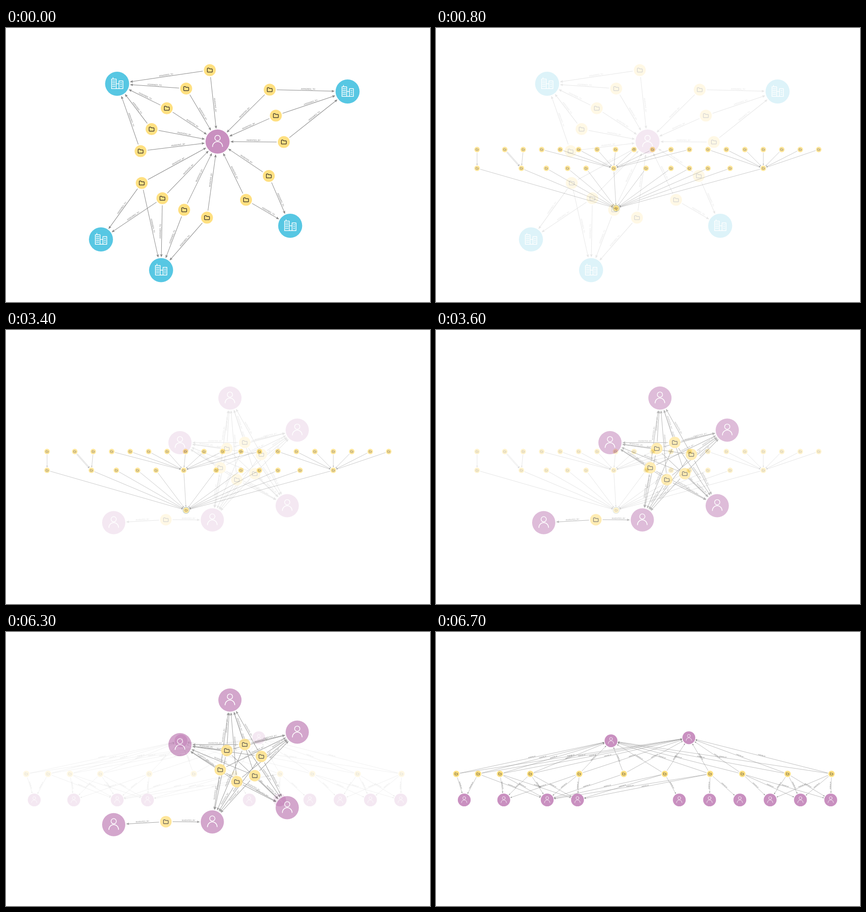
Recreate the animation shown at these times as an HTML page with a canvas. Size 931x602 px, loop 8 s.

```html
<!DOCTYPE html>
<html lang="en">
<head>
<meta charset="utf-8">
<title>Graph views</title>
<style>
html, body { margin: 0; width: 100%; height: 100%; overflow: hidden; background: #fff; }
canvas { display: block; width: 931px; height: 602px; }
</style>
</head>
<body>
<canvas id="stage"></canvas>
<script>
const W = 931, H = 602, LOOP = 8000;
const GREY = '#848484';
const dpr = window.devicePixelRatio || 1;

const kinds = {
  file: { r: 13.1, fill: '#ffe081', ink: '#222', pen: 1.25 },
  person: { r: 26.4, fill: '#c990c0', ink: '#fff', pen: 1.6 },
  company: { r: 26.4, fill: '#57c7e3', ink: '#fff', pen: 1.5 }
};
const close = { line: 1, text: '#6a6a6a', slide: 5 };
const distant = { line: 0.5, text: '#333', slide: 0 };

const times = (n, f) => Array.from({ length: n }, (_, i) => f(i));
const steps = (from, step, n) => times(n, i => from + step * i);
const node = (kind, x, y) => ({ kind, x, y });
const row = (kind, y, xs) => xs.map(x => node(kind, x, y));
const invented = (a, b) => ({ a, b, label: 'INVENTED_BY' });
const assigned = (a, b) => ({ a, b, label: 'ASSIGNED_TO' });

// n files spread evenly on the parabola through three points
function curve(n, [x0, y0], [x1, y1], [x2, y2]) {
  return times(n, i => {
    const t = i / (n - 1);
    const a = (2 * t - 1) * (t - 1), b = 4 * t * (1 - t), c = t * (2 * t - 1);
    return node('file', a * x0 + b * x1 + c * x2, a * y0 + b * y1 + c * y2);
  });
}

function setup(canvas) {
  canvas.width = W * dpr;
  canvas.height = H * dpr;
  const g = canvas.getContext('2d');
  g.scale(dpr, dpr);
  return g;
}

function line(g, x0, y0, x1, y1) {
  g.moveTo(x0, y0);
  g.lineTo(x1, y1);
}

// Icons are drawn around the node centre at scale 1
const icons = {
  file(g) {
    g.roundRect(-5.4, -2.7, 10.9, 7.1, [0, 1, 1, 1]);
    line(g, -5.4, -2.7, -5, -4.4);
    g.lineTo(-1.8, -4.4);
    g.lineTo(-0.3, -2.7);
    // The tab opens into the body
    g.moveTo(-5.4, -2.7);
  },
  person(g) {
    g.arc(0, -7.8, 6, 0, Math.PI * 2);
    g.moveTo(-11, 11.3);
    g.arc(0, 11, 11, Math.PI, 0);
  },
  company(g) {
    g.rect(-12.3, -10.3, 10.4, 21);
    g.rect(4.2, -6.3, 8.6, 17);
    line(g, -9, -13.5, -9, -10.3);
    line(g, -1.9, 0, 4.2, 0);
    line(g, -1.9, 10.7, 4.2, 10.7);
    steps(-6, 4, 4).forEach(y => line(g, -10.3, y, -4.2, y));
    steps(-2, 4, 3).forEach(y => line(g, 7.3, y, 10, y));
  }
};
icons.file = g => {
  g.moveTo(-0.3, -2.7);
  g.lineTo(-1.8, -4.4);
  g.arcTo(-5.4, -4.4, -5.4, 4.4, 1);
  g.arcTo(-5.4, 4.4, 5.5, 4.4, 1);
  g.arcTo(5.5, 4.4, 5.5, -2.7, 1);
  g.arcTo(5.5, -2.7, -0.3, -2.7, 1);
  g.closePath();
};

function disc(g, r, fill) {
  g.beginPath();
  g.arc(0, 0, r, 0, Math.PI * 2);
  g.fillStyle = fill;
  g.fill();
}

function drawNode(g, n, k) {
  const { r, fill, ink, pen } = kinds[n.kind];
  g.save();
  g.translate(n.x, n.y);
  g.scale(k, k);
  if (n.ring) {
    disc(g, r + 3.2, '#9cb0a8');
    disc(g, r + 1.2, '#e3ece0');
  }
  disc(g, r, fill);
  g.strokeStyle = ink;
  g.lineWidth = pen;
  g.lineJoin = g.lineCap = 'round';
  g.beginPath();
  icons[n.kind](g);
  g.stroke();
  g.restore();
}

function drawEdge(g, { a, b, label, shift = 0 }, k, style) {
  const angle = Math.atan2(b.y - a.y, b.x - a.x);
  const start = (kinds[a.kind].r + 2.5) * k;
  const end = Math.hypot(b.x - a.x, b.y - a.y) - (kinds[b.kind].r + (b.ring ? 4 : 1.8)) * k;
  const head = 7 * k, notch = end - head * 0.8;
  g.save();
  g.translate(a.x, a.y);
  g.rotate(angle);
  g.translate(0, shift);
  g.strokeStyle = g.fillStyle = GREY;
  g.lineWidth = style.line;
  g.beginPath();
  line(g, start, 0, notch, 0);
  g.stroke();
  g.beginPath();
  line(g, end, 0, end - head, -2.8 * k);
  g.lineTo(notch, 0);
  g.lineTo(end - head, 2.8 * k);
  g.fill();
  if (label) {
    const flip = Math.cos(angle) < 0;
    g.translate((start + end) / 2 + (flip ? 0 : style.slide * k), 0);
    if (flip) g.rotate(Math.PI);
    g.scale(k, k);
    g.font = '4.45px "Liberation Sans", Arial, sans-serif';
    g.textAlign = 'center';
    g.fillStyle = style.text;
    g.fillText(label, 0, -1.9);
  }
  g.restore();
}

function render({ k, style, nodes, edges }) {
  const canvas = document.createElement('canvas');
  const g = setup(canvas);
  g.fillStyle = '#fff';
  g.fillRect(0, 0, W, H);
  edges.forEach(e => drawEdge(g, e, k, style));
  nodes.forEach(n => drawNode(g, n, k));
  return canvas;
}

function inventorHub() {
  const hub = node('person', 464.5, 249.5);
  const nodes = [hub], edges = [];
  const fan = (x, y, docs) => {
    const firm = node('company', x, y);
    nodes.push(firm, ...docs);
    docs.forEach(d => edges.push(invented(d, hub), assigned(d, firm)));
  };
  const low = curve(4, [298, 340.5], [367, 387.7], [441.3, 416.7]);
  fan(244, 122.5, curve(5, [447.5, 92.5], [353, 176.3], [295.5, 270.5]));
  fan(750, 139.5, curve(3, [579, 135.5], [592.5, 192.5], [610, 250.5]));
  fan(624, 434.5, curve(2, [577, 325], [552, 351], [527, 377.5]));
  fan(340.5, 532, low);
  const shared = node('company', 208.5, 464.5);
  nodes.push(shared);
  low.slice(0, 2).forEach(d => edges.push(assigned(d, shared)));
  return { k: 1, style: close, nodes, edges };
}

function citationTree() {
  const left = 151, gap = 40.55;
  const columns = [-1.5, 0.9, 2.25, 3.4, 4.4, 5.9, 7.65, 9, 10, 11, 12.2, 14];
  const root = { ...node('file', 395.5, 396), ring: true };
  const mids = row('file', 308.3, columns.map(c => left + gap * c));
  const first = node('file', mids[0].x, 267);
  const tops = row('file', 267, steps(left, gap, 18));
  const edges = [...mids.map(a => ({ a, b: root })), { a: first, b: mids[0] }];
  tops.forEach((a, i) => {
    const b = mids[i < 2 ? 1 : i < 11 ? 5 : 11];
    const shifts = i ? [0] : [-1, 1];
    shifts.forEach(shift => edges.push({ a, b, shift }));
  });
  return { k: 0.46, style: distant, nodes: [root, ...mids, first, ...tops], edges };
}

function inventorStar() {
  const team = [[491.7, 149.5], [639.5, 220], [617.5, 386], [453, 417.3], [382, 247.5]]
    .map(([x, y]) => node('person', x, y));
  // A slightly oval ring of files inside the team
  const docs = times(6, i => {
    const a = (60 * i - 78) * Math.PI / 180;
    const r = 43.5 + 4 * Math.cos(2 * a + 0.7);
    return node('file', 515.5 + r * Math.cos(a), 288 + r * Math.sin(a));
  });
  const far = node('person', 236.5, 423.3);
  const link = node('file', 351, 416.8);
  const edges = docs.flatMap(d => team.map(p => invented(d, p)));
  edges.push(invented(link, far), invented(link, team[3]));
  return { k: 0.965, style: close, nodes: [...team, far, ...docs, link], edges };
}

function inventorLayers() {
  const leads = [node('person', 384.3, 239), node('person', 555.2, 232.3)];
  const docs = row('file', 311.7,
    [...steps(44.5, 48, 3), 207, 314.5, 412.3, 502.3, 601.8, 672.5, 772, 868.5]);
  const team = row('person', 369,
    [62, 148.8, ...steps(244.2, 66.5, 2), ...steps(534.2, 66.5, 6)]);
  // One word per file; each digit is a team member
  const links = '0 02 123 123 123 2 234 2356 789 789 789'.split(' ');
  const edges = docs.flatMap((d, i) =>
    [...leads, ...[...links[i]].map(j => team[j])].map(p => invented(d, p)));
  return { k: 0.535, style: distant, nodes: [...leads, ...team, ...docs], edges };
}

const scenes = [inventorHub, citationTree, inventorStar, inventorLayers].map(f => render(f()));
const fadeStart = n => 500 + 2900 * (n - 1);
const ctx = setup(document.getElementById('stage'));

function show(scene, alpha) {
  ctx.globalAlpha = alpha;
  ctx.drawImage(scene, 0, 0, W, H);
}

function frame() {
  const t = performance.now() % LOOP;
  const n = Math.floor((t - fadeStart(0)) / 2900);
  show(scenes[Math.max(0, n - 1)], 1);
  // Each cross-fade runs in five 100 ms steps
  if (n) show(scenes[n], Math.min(1, (Math.floor((t - fadeStart(n)) / 100) + 1) / 5));
  requestAnimationFrame(frame);
}
frame();
</script>
</body>
</html>
```
